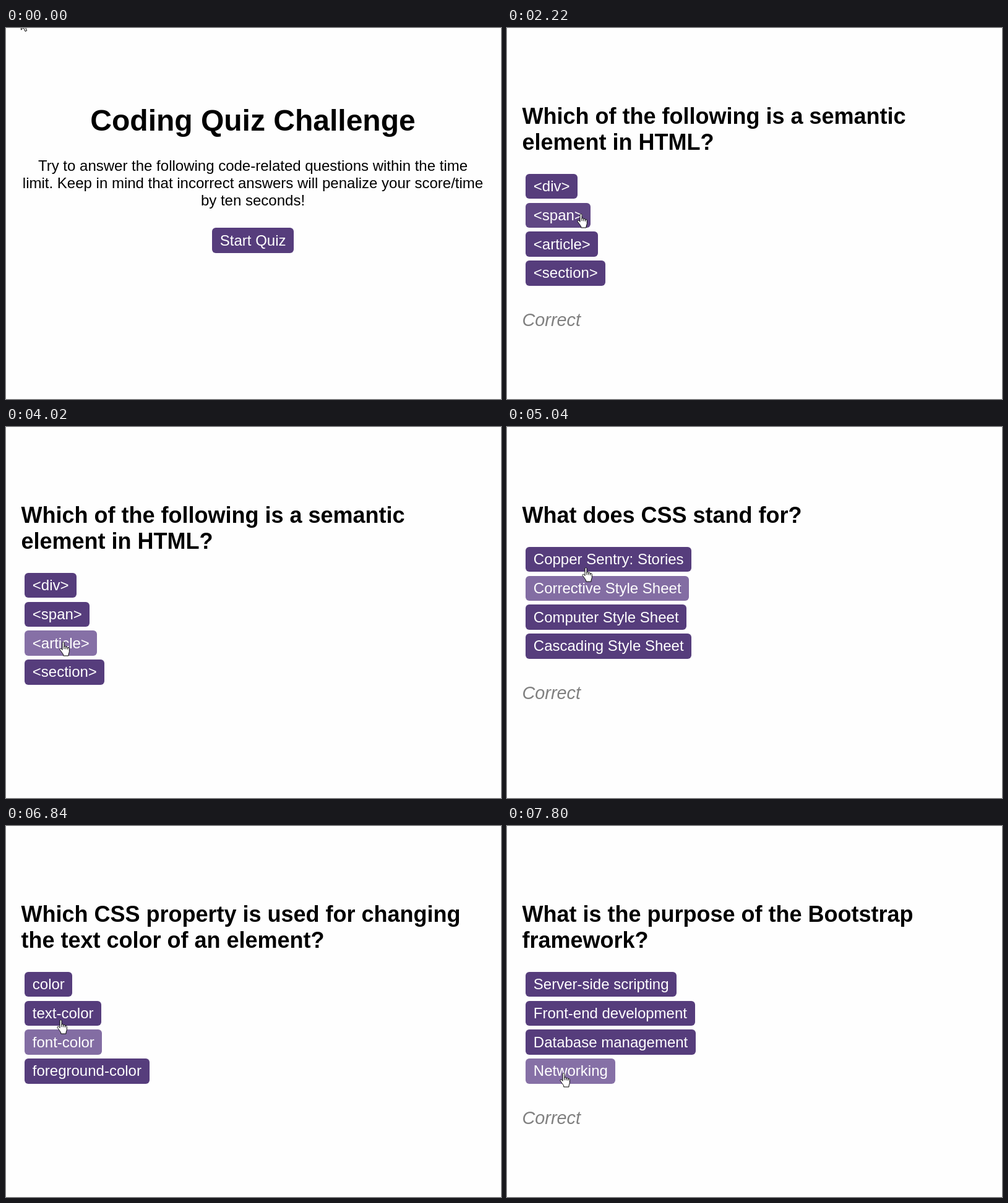
Recreate the animation shown at these times as an HTML page. Size 800 by 600 pixels, loop 8 s.

```html
<!DOCTYPE html>
<html lang="en">
<head>
<meta charset="utf-8">
<title>Coding quiz</title>
<style>
  html, body { margin: 0; width: 100%; height: 100%; overflow: hidden; background: #fefefe; }
  svg { display: block; font: 24px Arial, "Liberation Sans", sans-serif; }
  .title { font-weight: bold; font-size: 36px; }
  .intro { text-anchor: middle; }
  .intro.title { font-size: 48px; }
  .label { fill: #fff; }
  .note { font-style: italic; font-size: 28.8px; fill: #808080; }
  #cursor path { fill: #fff; stroke: #000; stroke-linejoin: round; stroke-linecap: round; }
</style>
</head>
<body>
<svg id="stage" width="800" height="600" viewBox="0 0 800 600">
  <g id="pages"></g>
  <g id="cursor">
    <path id="arrow" d="M.5 .5V17L4.4 13.4L7 19.4L9.6 18.3L7.1 12.4H12Z"/>
    <path id="hand" transform="translate(-6.5 0)" d="M5.5 13V2.2c0-2 3-2 3 0V8.5c0-1.4 2.9-1.4 2.9.3v.6c0-1.3 2.8-1.2 2.8.5v.6c0-1.1 2.6-1.1 2.6.9v5.1c0 1.8-1.3 3-1.3 4.5v2H7.2v-1.7c-1-2.2-3.4-5.2-5.3-7.8-1.3-2 .9-3 2.1-1.9zM8.5 8.5v3.3M11.4 9.2v2.8M14.2 10.2v2.2"/>
  </g>
</svg>
<script>
const LOOP = 8000, STEP = 60, NOTE_TIME = 1000;
const LEFT = 24.5, TITLE_LINE = 42, ROW = 46.75;
const BASE = [86, 61, 124], HOVER = [134, 112, 166];
const $ = id => document.getElementById(id);

const quiz = [
  { start: 900, title: ['What does HTML stand for?'],
    answers: ['Hyper Text Markup Language', 'High-level Text Machine Language',
      'Hyperlink and Text Markup Language', 'Home Tool Markup Language'] },
  { start: 1680, note: true, title: ['Which of the following is a semantic', 'element in HTML?'],
    answers: ['<div>', '<span>', '<article>', '<section>'] },
  { start: 4680, note: true, title: ['What does CSS stand for?'],
    answers: ['Copper Sentry: Stories', 'Corrective Style Sheet', 'Computer Style Sheet', 'Cascading Style Sheet'] },
  { start: 5580, note: true, title: ['Which CSS property is used for changing', 'the text color of an element?'],
    answers: ['color', 'text-color', 'font-color', 'foreground-color'] },
  { start: 7080, note: true, title: ['What is the purpose of the Bootstrap', 'framework?'],
    answers: ['Server-side scripting', 'Front-end development', 'Database management', 'Networking'] }
];

// The pointer glides to each stop and rests there until the next move
const home = { x: 24, y: -14 };
const moves = [
  { at: 60, time: 720, x: 374, y: 348 },
  { at: 1320, time: 300, x: 165, y: 215 },
  { at: 2040, time: 300, x: 110, y: 316 },
  { at: 2580, time: 720, x: 92, y: 354 },
  { at: 3300, time: 720, x: 92, y: 347 },
  { at: 4680, time: 240, x: 116, y: 255 },
  { at: 4980, time: 120, x: 131, y: 218 },
  { at: 5160, time: 300, x: 90, y: 350 },
  { at: 5580, time: 720, x: 88, y: 345 },
  { at: 6780, time: 240, x: 88, y: 272 },
  { at: 7140, time: 600, x: 91, y: 399 }
];

function add(parent, tag, attrs, text) {
  const el = document.createElementNS('http://www.w3.org/2000/svg', tag);
  for (const key in attrs) el.setAttribute(key, attrs[key]);
  if (text) el.textContent = text;
  parent.append(el);
  return el;
}

function addButton(page, text, x, y, baseline) {
  const top = Math.round(y), bottom = Math.round(y + 40.5);
  const rect = add(page.el, 'rect', { x, y: top, height: bottom - top, rx: 6 });
  const label = add(page.el, 'text', { x: x + 12.8, y: baseline, class: 'label' }, text);
  const width = Math.round(label.getComputedTextLength() + 25.4);
  rect.setAttribute('width', width);
  page.buttons.push({ rect, x, right: x + width, top, bottom });
}

function newPage(start) {
  return { start, el: add($('pages'), 'g'), buttons: [] };
}

function buildIntro() {
  const page = newPage(0);
  add(page.el, 'text', { x: 399, y: 166, class: 'intro title' }, 'Coding Quiz Challenge');
  ['Try to answer the following code-related questions within the time',
    'limit. Keep in mind that incorrect answers will penalize your score/time',
    'by ten seconds!'
  ].forEach((line, i) => add(page.el, 'text', { x: 399, y: 231 + 28 * i, class: 'intro' }, line));
  addButton(page, 'Start Quiz', 333, 323.1, 352);
  return page;
}

function buildQuestion({ start, note, title, answers }) {
  const page = newPage(start), shift = TITLE_LINE * (title.length - 1);
  title.forEach((line, i) => add(page.el, 'text', { x: LEFT, y: 155 + TITLE_LINE * i, class: 'title' }, line));
  answers.forEach((text, i) => {
    const y = 193.9 + shift + ROW * i;
    addButton(page, text, 30, y, Math.round(y + 28.2));
  });
  if (note) page.note = add(page.el, 'text', { x: LEFT, y: 439.5 + shift, class: 'note' }, 'Correct');
  return page;
}

const pages = [buildIntro(), ...quiz.map(buildQuestion)];

function pointer(t) {
  const i = moves.findLastIndex(m => m.at <= t);
  if (i < 0) return home;
  const from = moves[i - 1] || home, to = moves[i];
  const rest = 1 - Math.min(1, (t - to.at) / to.time);
  const ease = 1 - rest * rest;
  return { x: from.x + (to.x - from.x) * ease, y: from.y + (to.y - from.y) * ease };
}

function isOver(b, t) {
  const { x, y } = pointer(t);
  return x >= b.x && x < b.right && y >= b.top && y < b.bottom;
}

// Hover colour fades over 150 ms and trails the pointer slightly
function hoverLevel(page, b, t) {
  let hits = 0;
  for (let i = 0; i < 15; i++) {
    const past = t - 30 - i * 10;
    if (past >= page.start && isOver(b, past)) hits++;
  }
  return hits / 15;
}

function show(el, on) {
  el.style.display = on ? '' : 'none';
}

function draw(t) {
  const page = pages.findLast(p => p.start <= t);
  for (const p of pages) show(p.el, p === page);
  for (const b of page.buttons) {
    const k = hoverLevel(page, b, t);
    b.rect.style.fill = `rgb(${BASE.map((c, i) => Math.round(c + (HOVER[i] - c) * k))})`;
  }
  if (page.note) show(page.note, t < page.start + NOTE_TIME);
  const { x, y } = pointer(t);
  const over = page.buttons.some(b => isOver(b, t));
  $('cursor').setAttribute('transform', `translate(${Math.round(x)} ${Math.round(y)})`);
  show($('hand'), over);
  show($('arrow'), !over);
}

const begin = performance.now();
function tick() {
  const t = (performance.now() - begin) % LOOP;
  draw(Math.floor(t / STEP) * STEP);
  requestAnimationFrame(tick);
}
tick();
</script>
</body>
</html>
```
